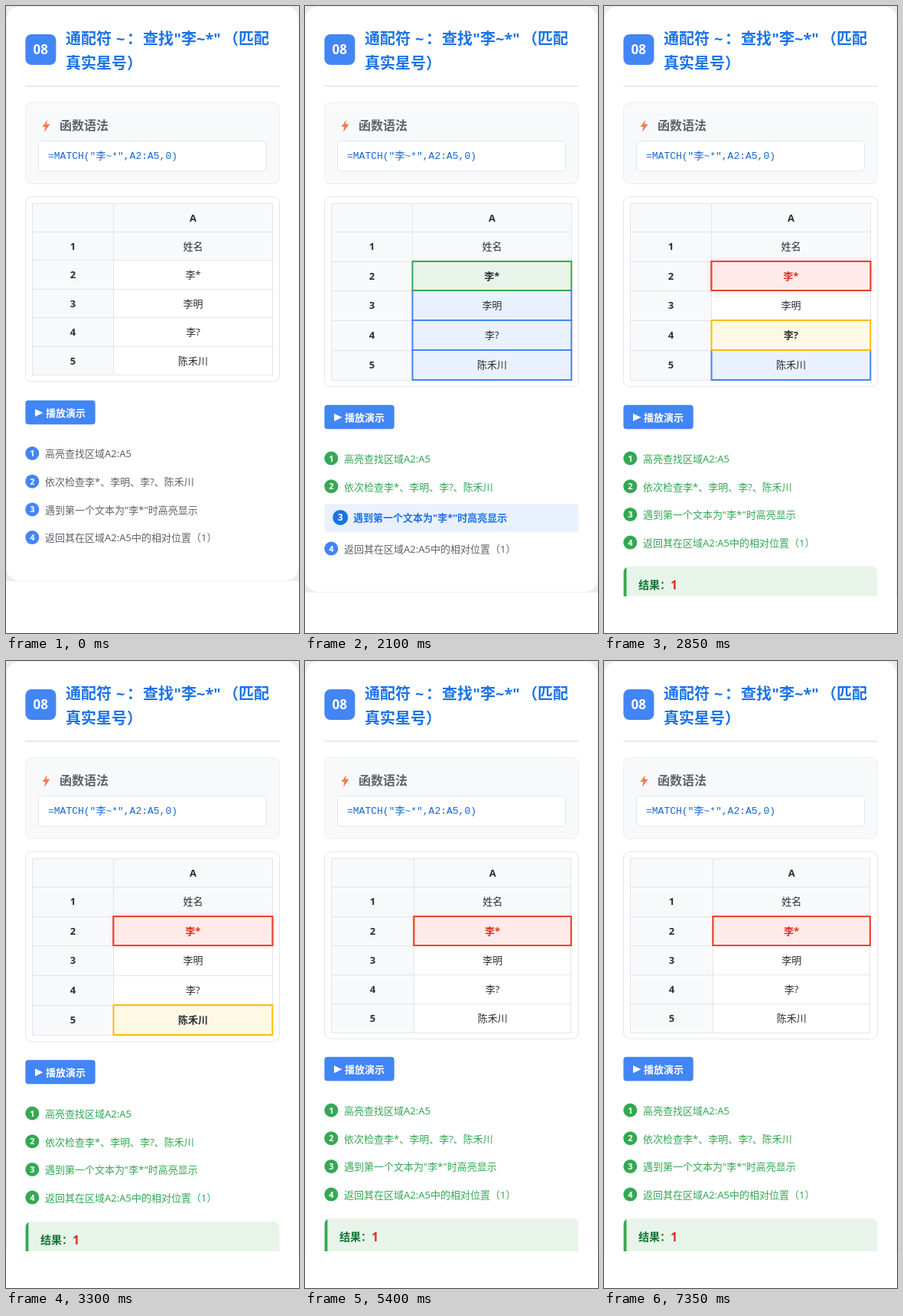
These frames come from a looping animation (383x820 px, 9750 ms). An HTML page with a canvas:

```html
<!DOCTYPE html>
<html lang="zh-CN">
<head>
<meta charset="utf-8">
<title>MATCH</title>
<style>
html, body { margin: 0; width: 100%; height: 100%; overflow: hidden; background: #fff; }
canvas { display: block; width: 383px; height: 820px; }
</style>
</head>
<body>
<canvas id="stage"></canvas>
<script>
const W = 383, H = 820, VIEW = 772, LOOP = 9750, TICK = 150;
const SANS = '"Noto Sans", "Noto Sans CJK SC", "Noto Sans CJK", sans-serif';
const MONO = '"Liberation Mono", "Noto Sans CJK SC", "Noto Sans CJK", monospace';
const BLUE = '#4285f4', DEEP = '#1a73e8', GREEN = '#34a853', GREY = '#5f6368';
const LINE = '#e2e5e9', PALE = '#f8f9fa', INK = '#2c2f33';
const LEFT = 25.4, WIDE = 332.2;

const cells = ['A', '姓名', '李*', '李明', '李?', '陈禾川'];
const steps = [
  '高亮查找区域A2:A5',
  '依次检查李*、李明、李?、陈禾川',
  '遇到第一个文本为"李*"时高亮显示',
  '返回其在区域A2:A5中的相对位置（1）'
];

const marks = {
  b: { fill: '#eaf1fe', line: BLUE, text: INK },
  y: { fill: '#fff8e3', line: '#fbbc04', text: INK, bold: true },
  g: { fill: '#e8f4ea', line: GREEN, text: INK, bold: true },
  r: { fill: '#feebe9', line: '#ea4335', text: '#d93025', bold: true }
};

// Table geometry: column edges, row edges, frame bottom, shift of what follows
const layouts = {
  plain: { x: [34.5, 140.5, 348.5], y: [258.5, 295.5, 332.5, 370.5, 407.5, 445.5, 482.5], end: 491.5, dy: 0 },
  marked: { x: [34.5, 140.5, 348.3], y: [258.5, 295, 334, 372, 411, 450, 489], end: 498, dy: 6.5 },
  found: { x: [34.5, 142.5, 347.8], y: [258.5, 295, 334, 372, 410.5, 448.5, 486], end: 494, dy: 2.5 }
};

// Start time, layout, marks of rows 2 to 5, active step (5 = all done)
const scenes = [
  [0, 'plain', '----', 0],
  [1500, 'marked', 'bbbb', 1],
  [1650, 'marked', 'bbbb', 2],
  [1800, 'marked', 'ybbb', 2],
  [1950, 'marked', 'gbbb', 3],
  [2250, 'marked', 'rbbb', 4],
  [2550, 'marked', 'rybb', 4],
  [2700, 'marked', 'r-bb', 4],
  [2850, 'marked', 'r-yb', 5],
  [3150, 'marked', 'r--b', 5],
  [3300, 'marked', 'r--y', 5],
  [3600, 'found', 'r---', 5]
];
const RESULT_AT = 2400;

const stage = document.getElementById('stage');
const ratio = window.devicePixelRatio || 1;
stage.width = W * ratio;
stage.height = H * ratio;
const c = stage.getContext('2d');

function box(x, y, w, h, r, fill, line) {
  c.beginPath();
  c.roundRect(x, y, w, h, r);
  if (fill) { c.fillStyle = fill; c.fill(); }
  if (line) { c.strokeStyle = line; c.lineWidth = 1; c.stroke(); }
}

function rect(x, y, w, h, fill) {
  c.fillStyle = fill;
  c.fillRect(x, y, w, h);
}

function poly(fill, ...p) {
  c.beginPath();
  for (let i = 0; i < p.length; i += 2) c.lineTo(p[i], p[i + 1]);
  c.fillStyle = fill;
  c.fill();
}

// y is the middle of the glyphs
function text(str, x, y, size, color, weight = 400, align = 'left', font = SANS) {
  c.font = `${weight} ${size}px ${font}`;
  c.textAlign = align;
  c.fillStyle = color;
  c.fillText(str, x, Math.round(y + size * 0.37));
}

function header() {
  box(LEFT, 37, 40, 40, 8, BLUE);
  text('08', 45.3, 57, 17, '#fff', 700, 'center');
  const parts = [['通配符', 78], ['~', 144], ['：', 158], ['查找', 179], ['"李~*"', 219.5], ['（匹配', 284]];
  for (const [str, x] of parts) text(str, x, 42.5, 20, DEEP, 700);
  text('真实星号）', 78, 74.5, 20, DEEP, 700);
  rect(LEFT, 104, WIDE, 2, '#e8eaed');
}

function syntax() {
  box(25.5, 126.5, 332, 106, 8, PALE, '#eceef0');
  const glow = c.createLinearGradient(48, 150, 57, 164);
  glow.addColorStop(0, '#f58a4b');
  glow.addColorStop(1, '#ea6a5c');
  poly(glow, 54, 149, 47.5, 158, 51.5, 158, 50, 165, 57.5, 154.5, 53, 154.5);
  text('函数语法', 70, 156.5, 16, GREY, 700);
  box(42.5, 176.5, 298, 39.5, 4, '#fff', LINE);
  text('=MATCH("李~*",A2:A5,0)', 55, 195.5, 13, '#1967d2', 400, 'left', MONO);
}

function markCell(mark, x0, x1, y0, y1, glow) {
  if (mark === marks.r && glow > 0.02) {
    c.save();
    c.shadowColor = `rgba(234,67,53,${0.3 * glow})`;
    c.shadowBlur = 6 * ratio;
    rect(x0 - 1, y0 - 1, x1 - x0 + 2, y1 - y0 + 2, mark.line);
    c.restore();
  }
  rect(x0, y0, x1 - x0, y1 - y0, mark.fill);
  c.strokeStyle = mark.line;
  c.lineWidth = 2;
  c.strokeRect(x0, y0, x1 - x0, y1 - y0);
}

function table({ x, y, end }, code, glow) {
  box(25.5, 249.5, 332, end - 249.5, 8, '#fff', LINE);
  const [left, mid, right] = x, top = y[0], bottom = y[6];
  rect(left, top, mid - left, bottom - top, PALE);
  rect(mid, top, right - mid, y[2] - top, PALE);
  const x0 = Math.floor(left), y0 = Math.floor(top);
  for (const v of y) rect(x0, Math.floor(v), Math.floor(right) - x0 + 1, 1, LINE);
  for (const v of x) rect(Math.floor(v), y0, 1, Math.floor(bottom) - y0 + 1, LINE);

  // Shared borders: blue lowest, red highest
  for (const kind of 'bygr') {
    [...code].forEach((m, i) => {
      if (m === kind) markCell(marks[m], mid, right, y[i + 2], y[i + 3], glow);
    });
  }
  cells.forEach((str, i) => {
    const cy = (y[i] + y[i + 1]) / 2;
    const mark = marks[code[i - 2]];
    const weight = i === 1 ? 500 : !i || mark && mark.bold ? 700 : 400;
    if (i) text(i, (left + mid) / 2, cy, 13, INK, 700, 'center');
    text(str, (mid + right) / 2, cy, 13, mark ? mark.text : INK, weight, 'center');
  });
}

function button(dy) {
  const y = Math.round(531.5 + dy);
  box(LEFT, y - 16.3, 91.3, 31.6, 4, BLUE);
  poly('#fff', 38, y - 5, 38, y + 5, 48.5, y);
  text('播放演示', 52, y + 0.5, 13, '#fff', 700);
}

// Middles of the four steps; the active one keeps a wider gap around it
function stepRows(dy, active) {
  const rows = [585 + dy];
  for (let n = 2; n <= 4; n++) {
    const wide = n === active || (active > 0 && n === active + 1);
    rows.push(rows[n - 2] + (wide ? 40.7 : 36.7));
  }
  return rows;
}

function list(rows, active) {
  rows.forEach((y, i) => {
    const n = i + 1, on = n === active, done = n < active;
    if (on) box(LEFT, y - 18, WIDE, 36.5, 4, '#eaf1fe');
    const x = on ? 46.2 : 34.3;
    c.beginPath();
    c.arc(x, y, on ? 10 : 9, 0, 7);
    c.fillStyle = on ? DEEP : done ? GREEN : BLUE;
    c.fill();
    text(n, x, y, on ? 12 : 11, '#fff', 700, 'center');
    text(steps[i], on ? 63 : 51, y + 0.5, 13, on ? DEEP : done ? GREEN : GREY, on ? 700 : 400);
  });
}

function result(y) {
  c.save();
  c.beginPath();
  c.roundRect(LEFT, y, WIDE, 52, 8);
  c.clip();
  rect(LEFT, y, WIDE, 52, '#e8f4e9');
  rect(LEFT, y, 4, 52, GREEN);
  c.restore();
  text('结果：', 45, y + 24, 14, '#137333', 700);
  text('1', 87, y + 24, 16, '#d93025', 700);
}

function pulse(t) {
  if (t < 3300) return 1;
  const p = (Math.min(t, 7350) - 4200) / 1500;
  return 0.5 - 0.5 * Math.cos(p * 2 * Math.PI);
}

function draw(now) {
  const t = Math.floor((now % LOOP) / TICK) * TICK;
  const [, name, code, active] = scenes.findLast(s => s[0] <= t);
  const layout = layouts[name];
  const rows = stepRows(layout.dy, active);
  const end = rows[3] + (active === 4 ? 4 : 0);
  const solved = t >= RESULT_AT;
  const bottom = solved ? 840 : Math.round(end + 57);

  c.setTransform(ratio, 0, 0, ratio, 0, 0);
  rect(0, 0, W, H, '#fff');
  c.save();
  c.beginPath();
  c.rect(0, 0, W, VIEW);
  c.clip();
  rect(0, 0, W, Math.min(bottom, VIEW), '#ebecee');
  box(0.5, 0.5, W - 1, bottom - 1, 16, '#fff', '#f0f1f3');
  header();
  syntax();
  table(layout, code, pulse(t));
  button(layout.dy);
  list(rows, active);
  if (solved) result(Math.round(end + 31));
  c.restore();
}

function frame() {
  draw(performance.now());
  requestAnimationFrame(frame);
}
frame();
</script>
</body>
</html>
```
